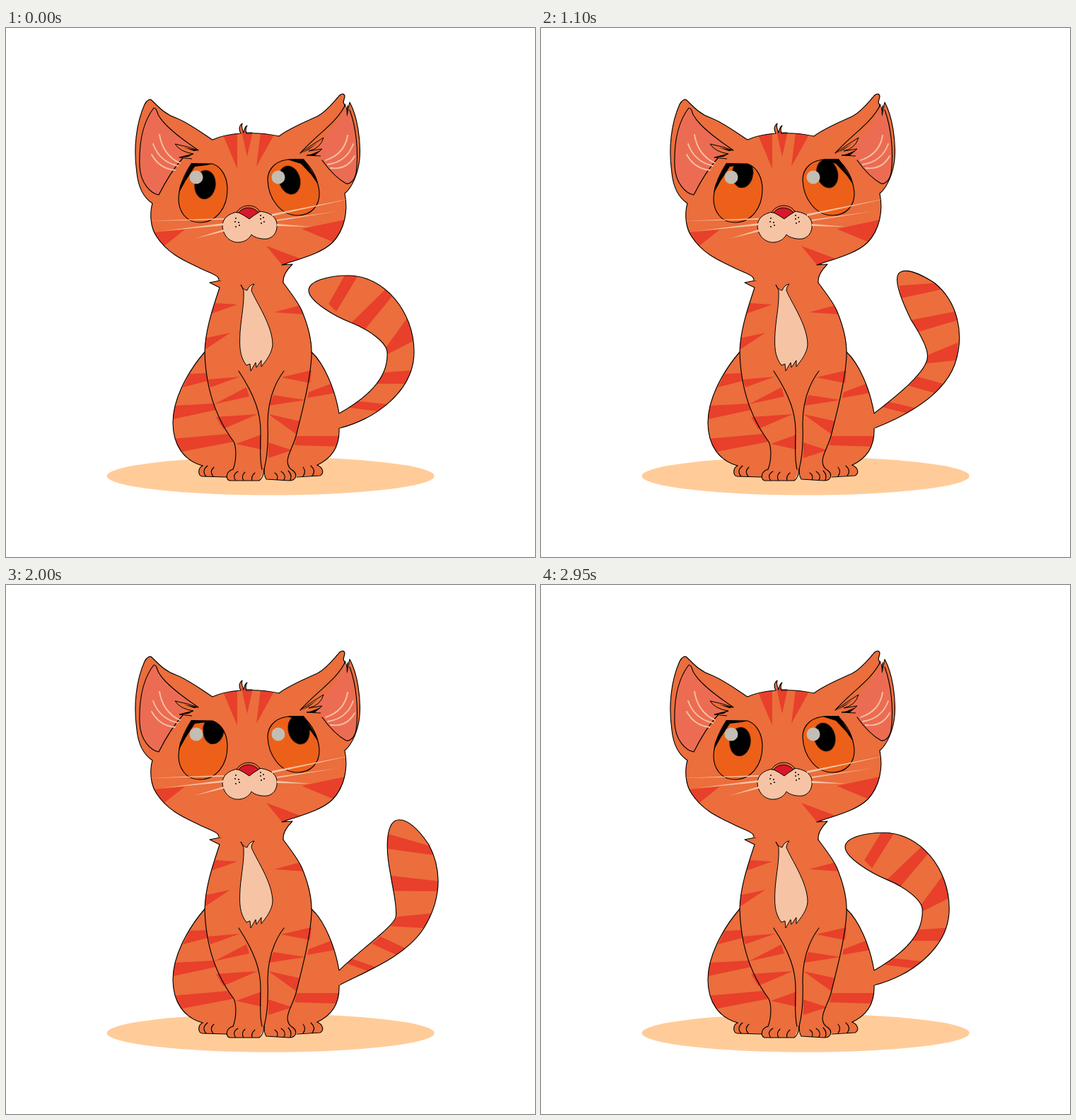
An HTML page without scripts for the animation above (3000 ms loop, 748 by 748 pixels).

```html
<!DOCTYPE html>
<html lang="en">
<head>
<meta charset="utf-8">
<title>Ginger cat</title>
<style>
html, body { margin: 0; width: 100%; height: 100%; overflow: hidden; background: #fff; }
svg { display: block; width: 100vw; height: 100vh; }

.fur { fill: #eb6e3c; }
.red { fill: #e8402a; }
.pink { fill: #ec6c53; }
.cream { fill: #f6c4a4; }
.iris { fill: #ed6019; }
.shine { fill: #c3bdb3; }
.line { fill: none; stroke: #000; stroke-width: 1.15; stroke-linecap: round; stroke-linejoin: round; }
.ink { stroke: #000; stroke-width: 1; stroke-linejoin: round; }
.hair { fill: none; stroke: #f6c4a4; stroke-width: 1.8; stroke-linecap: round; }

/* Tail: curled, raised, swung out; the easing of one swing is split at the raised pose */
.tail { animation: tail 3s infinite; }
.bands { animation: bands 3s infinite; }
@keyframes tail {
  0%, 49%, 100% {
    d: path("M471 566C522 553 577 514 577 458C577 400 534 350 484 350C458 350 428 357 428 371C428 386 465 408 489 417C516 428 539 446 539 459C541 497 508 524 471 545");
    animation-timing-function: cubic-bezier(.333, 0, .667, .584);
  }
  15%, 65.8% {
    d: path("M471 566C508 548 564 525 589 484C612 445 613 403 592 366C580 350 564 332 548 332C529 332 529 370 540 411C544 432 552 456 550 468C549 480 500 519 471 545");
    animation-timing-function: cubic-bezier(.333, .563, .667, 1);
  }
  23.7%, 75% {
    d: path("M471 566C506 540 569 531 601 490C621 467 649 423 628 372C621 353 609 332 599 332C579 332 571 373 565 409C563 429 561 444 558 474C551 492 500 505 471 545");
    animation-timing-function: cubic-bezier(.333, 0, .667, .437);
  }
  32.7%, 83.9% {
    d: path("M471 566C508 548 564 525 589 484C612 445 613 403 592 366C580 350 564 332 548 332C529 332 529 370 540 411C544 432 552 456 550 468C549 480 500 519 471 545");
    animation-timing-function: cubic-bezier(.333, .416, .667, 1);
  }
}
@keyframes bands {
  0%, 49%, 100% {
    d: path("M456 390L480 348L499 348L467 401ZM487 418L537 369L547 378L506 428ZM537 452L568 409L581 440L540 461ZM535 487L578 484L568 503L522 503ZM491 527L540 532L527 542L486 537Z");
    animation-timing-function: cubic-bezier(.333, 0, .667, .584);
  }
  15%, 65.8% {
    d: path("M531 352L593 367L600 380L530 373ZM538 411L610 416L610 430L541 432ZM553 467L600 462L592 484L544 481ZM531 496L567 513L557 524L519 507ZM487 528L525 540L516 547L479 535Z");
    animation-timing-function: cubic-bezier(.333, .563, .667, 1);
  }
  23.7%, 75% {
    d: path("M578 349L633 379L638 394L574 370ZM563 409L636 436L633 449L561 435ZM556 479L614 476L604 491L543 490ZM520 502L558 519L546 527L510 509ZM488 526L514 542L505 545L481 531Z");
    animation-timing-function: cubic-bezier(.333, 0, .667, .437);
  }
  32.7%, 83.9% {
    d: path("M531 352L593 367L600 380L530 373ZM538 411L610 416L610 430L541 432ZM553 467L600 462L592 484L544 481ZM531 496L567 513L557 524L519 507ZM487 528L525 540L516 547L479 535Z");
    animation-timing-function: cubic-bezier(.333, .416, .667, 1);
  }
}

.lookL { animation: lookL 3s linear infinite; }
.lookR { animation: lookR 3s linear infinite; }
@keyframes lookL {
  0%, 74%, 100% { transform: translate(0, 0); }
  10%, 30% { transform: translate(-13.5px, -14px); }
  40%, 66.7% { transform: translate(12px, -17px); }
}
@keyframes lookR {
  0%, 74%, 100% { transform: translate(0, 0); }
  10%, 30% { transform: translate(-15px, -7px); }
  40%, 66.7% { transform: translate(13px, -10px); }
}
</style>
</head>
<body>
<svg viewBox="0 0 748 748">
  <defs>
    <path id="trunk" d="M308 356L288 360L302 367C293 395 282 425 281 458C262 480 236 520 236 558C236 590 252 612 278 619C271 622 271 634 278 634L313 635Q311 640 316 640L358 640L365 625L368 638Q385 639 400 640Q409 640 410 634L444 633C450 629 448 621 440 618C462 608 472 590 471 566L473 565L473 545L471 545C465 510 450 475 432 458C433 445 429 425 418 399C412 386 405 378 392 360L398 330L300 340Z"/>
    <path id="head" d="M292 158C275 147 258 134 240 127C225 122 216 112 207 103C204 99 199 102 196 108C184 135 180 170 185 205C187 225 195 240 207 248C203 262 204 282 213 295C230 321 255 330 275 340C290 347 298 349 300 353L301 357L392 360C391 352 397 342 405 334L390 335C420 325 447 318 462 303C479 285 484 258 479 234C490 225 498 205 500 185C502 160 497 125 486 105L482 124L477 105L479 97C479 93 475 92 472 95C465 102 455 117 440 125C425 132 400 142 386 153C372 150 358 148 340 149C339 146 338 142 341 138C338 139 337 143 336 148C335 145 332 141 334 135C331 137 328 142 332 149C318 150 305 152 292 158Z"/>
    <path id="eyeL" d="M262 192L292 192C306 197 313 212 313 228C313 255 297 275 274 275C254 275 244 259 244 241C245 222 252 207 262 192Z"/>
    <path id="eyeR" d="M404 185.500L420 186C433 198 441 212 443 232C444 252 431 265 412 265C388 265 371 241 370 215C370 197 384 186 404 185.500Z"/>
    <clipPath id="inTrunk"><use href="#trunk"/></clipPath>
    <clipPath id="inHead"><use href="#head"/></clipPath>
    <clipPath id="inL"><use href="#eyeL"/></clipPath>
    <clipPath id="inR"><use href="#eyeR"/></clipPath>
    <clipPath id="inTail"><path class="tail"/></clipPath>
  </defs>

  <ellipse cx="374.200" cy="633.500" rx="231.500" ry="27" fill="#ffcc99"/>

  <!-- Tail -->
  <path class="tail fur"/>
  <g clip-path="url(#inTail)"><path class="bands red"/></g>
  <path class="tail line"/>

  <!-- Body -->
  <use href="#trunk" class="fur"/>
  <g class="red" clip-path="url(#inTrunk)">
    <path d="M296 389L327 391L290 404ZM280 439L317 431L278 457ZM379 402L420 391L424 405Z"/>
    <path d="M260 489L283 488L285 499L250 508ZM285 497L331 493L289 508ZM294 532L340 508L344 521Z"/>
    <path d="M238 534L293 531L297 540L232 554ZM297 550L356 546L307 567ZM234 581L313 574L322 585L244 600ZM325 588L361 575L361 596Z"/>
    <path d="M389 494L432 484L430 502ZM378 519L424 526L372 534ZM371 546L416 556L410 574Z"/>
    <path d="M428 515L462 502L466 516L426 523ZM411 577L474 577L472 592L408 590ZM371 586L405 597L371 608Z"/>
  </g>
  <g class="line">
    <path d="M308 356L288 360L302 367C293 395 282 425 281 458C282 500 292 545 322 585C326 593 326 612 321 624"/>
    <path d="M281 458C262 480 236 520 236 558C236 590 252 612 278 619"/>
    <path d="M392 360C405 378 412 386 418 399C429 425 433 445 432 465C430 500 418 545 410 577C406 592 399 600 398 612Q398 622 406 626"/>
    <path d="M432 458C450 475 465 510 471 545M471 566C472 590 462 608 440 618"/>
    <path d="M329 485C352 520 360 545 360 570C360 590 358 608 362 624M393 485C378 505 370 530 370 560C371 585 370 605 365 624"/>
    <path d="M278 619C271 622 271 634 278 634L312 635M285 619Q276 626 283 634M294 621Q287 627 293 634"/>
    <path d="M321 624C311 627 310 637 316 640L358 640Q364 636 365 624M328 627Q319 632 325 640M338 628Q332 633 336 640M352 629Q346 634 348 640"/>
    <path d="M365 624Q365 633 368 638Q385 639 400 640C411 640 412 631 406 626M380 629Q386 633 383 639M389 627Q397 632 393 639M399 626Q405 632 402 639"/>
    <path d="M440 618C449 622 450 630 444 633L411 635M420 621Q425 627 420 634M431 619Q439 626 433 633"/>
  </g>

  <!-- Head -->
  <use href="#head" class="fur"/>
  <g class="red" clip-path="url(#inHead)">
    <path d="M306 149L327 146L327 199ZM333 146L349 146L341 182ZM360 147L380 149L354 196Z"/>
    <path d="M208 289L253 285L220 311ZM418 284L484 270L466 304ZM368 308L416 326L391 336Z"/>
  </g>
  <g class="line">
    <path d="M301 356L300 353C298 349 290 347 275 340C255 330 230 321 213 295C204 282 203 262 207 248C195 240 187 225 185 205C180 170 184 135 196 108C199 102 204 99 207 103C216 112 225 122 240 127C258 134 275 147 292 158C305 152 318 150 332 149C328 142 331 137 334 135C332 141 335 145 336 148C337 143 338 139 341 138C338 142 339 146 340 149C358 148 372 150 386 153C400 142 425 132 440 125C455 117 465 102 472 95C475 92 479 93 479 97L477 105L481 114L482 124L486 105C497 125 502 160 500 185C498 205 490 225 479 234C484 258 479 285 462 303C447 318 420 325 390 335L405 334C397 342 391 352 392 360"/>
    <path d="M340 148L348 148"/>
  </g>
  <path d="M477 104L481 113L484 108L482 125L480 116Z"/>

  <!-- Ears -->
  <path class="pink" d="M209 113C192 135 188 165 189 195C190 220 205 234 216 236C228 212 240 195 250 184L262 182L246 172L239 164L267 170C250 158 225 140 216 124C213 118 214 113 209 113Z"/>
  <path class="line" d="M250 184C240 195 228 212 216 236C205 234 190 220 189 195C188 165 192 135 209 113C214 113 213 120 216 124C225 140 250 158 272 173"/>
  <path class="fur ink" d="M272 173Q255 167 239 164Q246 175 265 178L245 183L263 185"/>
  <path d="M272 173L252 169L266 174ZM265 178L245 183L258 182Z"/>
  <path class="pink" d="M481 108C474 128 462 142 449 156L430 173L445 168L440 178L448 188C457 201 470 214 481 220C487 221 493 215 495 205C499 175 495 140 486 116L482 126Z"/>
  <path class="line" d="M480 108C468 134 440 150 416 177M486 116C495 140 499 175 495 205C493 215 487 221 481 220C470 214 457 201 447 187"/>
  <path class="fur ink" d="M416 177Q434 164 449 155Q445 170 428 174L447 171Q440 179 425 180L445 181"/>
  <path d="M418 177L440 163L428 172ZM428 180L445 173L437 180Z"/>
  <path class="hair" d="M217 151Q222 180 246 191M208 164Q217 189 243 195M206 179Q217 199 239 201M483 152Q479 178 452 187M491 164Q482 189 455 193M493 181Q482 201 459 198"/>

  <!-- Eyes -->
  <use href="#eyeL" class="iris"/>
  <g clip-path="url(#inL)"><g class="lookL"><ellipse cx="281.500" cy="221.500" rx="15" ry="20.500" transform="rotate(6 281.500 221.500)"/></g></g>
  <use href="#eyeL" class="line"/>
  <path d="M244 234L246 223L262 191L292 192L284 194L267 196L254 216Z"/>
  <circle class="shine" cx="269" cy="211" r="9.500"/>
  <use href="#eyeR" class="iris"/>
  <g clip-path="url(#inR)"><g class="lookR"><ellipse cx="401" cy="215" rx="15" ry="20.500" transform="rotate(-15 401 215)"/></g></g>
  <use href="#eyeR" class="line"/>
  <path d="M398 186L404 185L421 185L439 213L441 221L432 208L417 192Z"/>
  <circle class="shine" cx="385" cy="211" r="9.500"/>

  <!-- Muzzle -->
  <path class="cream ink" d="M328 260C314 262 306 270 306 280C307 295 318 304 330 303C340 302 345 296 347 292C352 297 362 299 370 298C381 295 384 285 383 276C381 265 370 260 357 259Z"/>
  <path class="fur ink" d="M326 261C333 248 353 248 359 260L344 262Z"/>
  <path fill="#d7182a" class="ink" d="M329 261C336 252 349 252 357 261Q350 265 344 270Q337 265 329 261Z"/>
  <path fill="none" stroke="#000" stroke-width="2" stroke-linecap="round" d="M325 269h0M324 274h0M329 275h0M325 281h0M330 279h0M360 265h0M364 268h0M360 270h0M365 274h0M361 276h0"/>
  <g class="cream">
    <path d="M308 269L197 273L308 271ZM308 276L222 287L308 279ZM311 284L266 298L311 287Z"/>
    <path d="M376 263L494 240L376 266ZM383 271L470 259L383 273ZM383 277L432 281L383 280Z"/>
  </g>

  <!-- Chest -->
  <path class="cream ink" d="M332 363Q336 371 341 371Q344 363 351 362Q347 366 347 371C353 387 377 420 377 448C376 460 368 470 361 479L361 470L354 480L353 473L346 485L345 475L340 477C330 464 330 450 331 430C333 405 337 390 336 371Z"/>
</svg>
</body>
</html>
```
